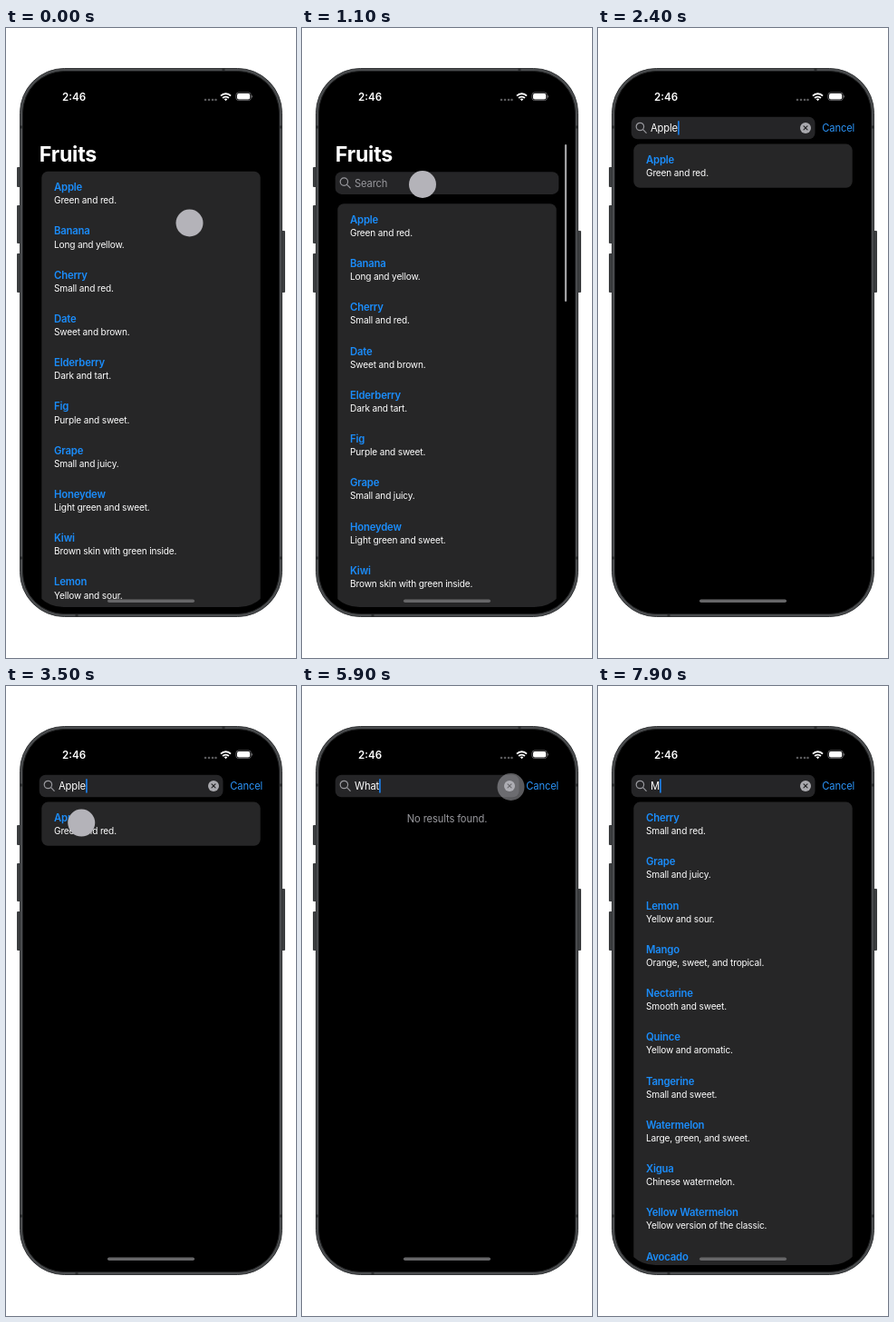
Recreate the animation shown at these times as an HTML page. Size 320x693 px, loop 8000 ms.

```html
<!DOCTYPE html>
<html lang="en">
<head>
<meta charset="utf-8">
<title>Fruits</title>
<style>
  html, body { margin: 0; width: 100%; height: 100%; overflow: hidden; background: #fff; }
  svg { display: block; width: 320px; height: 693px; }
  text { font: 400 11.2px Inter, "Liberation Sans", sans-serif; letter-spacing: -.13px; fill: #fff; }
  .name { font-size: 11.3px; font-weight: 600; letter-spacing: -.18px; fill: #1b8dfb; }
  .desc { font-size: 10.1px; letter-spacing: -.15px; }
  .title { font-size: 23.2px; font-weight: 700; letter-spacing: -.2px; }
  .time { font-size: 11.6px; font-weight: 600; letter-spacing: 0; }
  .hint { fill: #98989d; text-anchor: middle; }
  .head { font-size: 8.8px; letter-spacing: -.05px; fill: #8e8e93; }
  .blue { fill: #2b93f6; }
  .gray { fill: #98989d; }
  .panel { fill: #262627; }
</style>
</head>
<body>
<svg viewBox="0 0 320 693">
  <defs>
    <clipPath id="screen"><rect x="26" y="56" width="268" height="581" rx="37.5"/></clipPath>
  </defs>

  <!-- phone body -->
  <g fill="#3b3d3f">
    <rect x="12" y="153" width="5" height="22" rx="1"/>
    <rect x="12" y="195" width="5" height="42" rx="1"/>
    <rect x="12" y="248" width="5" height="43" rx="1"/>
    <rect x="303" y="223" width="5" height="68" rx="1"/>
  </g>
  <rect x="15.5" y="44.5" width="289" height="603" rx="49" fill="#4a4c4e" stroke="#333537"/>
  <path d="M240 44v4M78 644v4M15 109h4M301 109h4M15 583h4M301 583h4" stroke="#2b2d2e" stroke-width="3"/>
  <rect x="18.5" y="47.5" width="283" height="597" rx="46" fill="#000" stroke="#1d1e1f"/>

  <!-- status bar -->
  <text class="time" x="62" y="79.7">2:46</text>
  <g fill="#5a5a5c">
    <circle cx="220" cy="79" r="1.3"/><circle cx="224" cy="79" r="1.3"/>
    <circle cx="228" cy="79" r="1.3"/><circle cx="231.5" cy="79" r="1.3"/>
  </g>
  <g fill="none" stroke="#fff" stroke-width="1.9">
    <path d="M237 74.6a7.7 7.7 0 0 1 11 0M239.1 77a4.8 4.8 0 0 1 6.8 0"/>
  </g>
  <path d="M242.5 80.2l-1.8-1.9a2.6 2.6 0 0 1 3.6 0z" fill="#fff"/>
  <rect x="253.9" y="71" width="16.4" height="8.6" rx="2.7" fill="none" stroke="#77777a" stroke-width=".8"/>
  <rect x="255" y="72.1" width="14.2" height="6.4" rx="1.8" fill="#fff"/>
  <path d="M271.2 74v2.8q1-.4 1-1.4t-1-1.4z" fill="#77777a"/>

  <g clip-path="url(#screen)">
    <text class="title" id="title" x="36.7" y="147">Fruits</text>
    <g id="browse"></g>
    <g id="results"></g>

    <g id="recents">
      <text class="head" x="53" y="149">RECENT SEARCHES</text>
      <text class="blue" x="233" y="149.8" style="font-size:10.8px">CLEAR</text>
      <g id="recentRow" transform="translate(0 156.6)"></g>
    </g>

    <text class="hint" id="start" x="160" y="150" font-style="italic">Start searching for items now!</text>
    <text class="hint" id="none" x="160" y="150">No results found.</text>

    <g id="bar">
      <rect id="field" x="36.7" width="246.6" rx="7" fill="#252527"/>
      <g id="inner">
        <g fill="none" stroke="#98989d" stroke-width="1.2" stroke-linecap="round">
          <circle cx="46.4" cy="10.8" r="4.2"/><path d="M49.6 14l3.6 3.6"/>
        </g>
        <text class="gray" id="holder" x="58" y="16.4">Search</text>
        <text id="query" x="58" y="16.4"></text>
        <rect id="caret" y="4.4" width="1.6" height="15.6" rx=".8" fill="#1b84f4"/>
        <g id="clear">
          <circle cx="229" cy="12.2" r="6" fill="#a9a9ae"/>
          <path d="M227 10.2l4 4m0-4l-4 4" stroke="#252527" stroke-width="1.2" stroke-linecap="round"/>
        </g>
      </g>
    </g>
    <text class="blue" id="cancel" x="247.3" y="113.8">Cancel</text>

    <rect id="scroll" x="289.9" y="128" width="2.2" height="173" rx="1.1" fill="#a2a2a4"/>
    <rect x="112" y="628.4" width="96" height="3.5" rx="1.75" fill="#666668"/>
  </g>
  <circle id="dot" r="15" fill="#b4b3b9"/>
</svg>

<script>
const LOOP = 8000, ROW = 48.25;
const $ = id => document.getElementById(id);

const fruits = `Apple|Green and red.
Banana|Long and yellow.
Cherry|Small and red.
Date|Sweet and brown.
Elderberry|Dark and tart.
Fig|Purple and sweet.
Grape|Small and juicy.
Honeydew|Light green and sweet.
Kiwi|Brown skin with green inside.
Lemon|Yellow and sour.
Mango|Orange, sweet, and tropical.
Nectarine|Smooth and sweet.
Quince|Yellow and aromatic.
Tangerine|Small and sweet.
Watermelon|Large, green, and sweet.
Xigua|Chinese watermelon.
Yellow Watermelon|Yellow version of the classic.
Avocado|Creamy and green.`.split('\n').map(s => s.split('|'));

function panel(items) {
  if (!items.length) return '';
  const rows = items.map(([name, desc], i) => {
    const y = i * ROW;
    return `<text class="name" x="53" y="${y + 21.5}">${name}</text>` +
           `<text class="desc" x="53" y="${y + 35.6}">${desc}</text>`;
  });
  return `<rect class="panel" x="39.3" width="241.4" height="${items.length * ROW}" rx="7"/>` + rows.join('');
}

const find = q => fruits.filter(f => f.join(' ').toLowerCase().includes(q.toLowerCase()));

// Eased value between [time, value] stops
function tween(t, ...stops) {
  let [t0, v0] = stops[0];
  for (const [t1, v1] of stops) {
    if (t < t1) {
      const p = Math.max(0, (t - t0) / (t1 - t0));
      return v0 + (v1 - v0) * p * p * (3 - 2 * p);
    }
    t0 = t1; v0 = v1;
  }
  return v0;
}

// [time, text in the field]
const typing = [
  [1700, ''], [1900, 'A'], [2050, 'Ap'], [2200, 'App'], [2300, 'Appl'], [2400, 'Apple'],
  [4250, ''], [4800, 'W'], [5000, 'Wh'], [5200, 'Wha'], [5400, 'What'],
  [6250, ''], [7500, 'M']
];

function blink(since) {
  if (since < 500) return 1;
  const p = (since - 500) % 800;
  return p < 100 ? 1 - p / 100 : p < 300 ? 0 : 1;
}

const move = (el, x, y) => el.setAttribute('transform', `translate(${x} ${y})`);
const fade = (id, v) => { $(id).style.opacity = v; };

$('browse').innerHTML = panel(fruits);
$('recentRow').innerHTML = panel(fruits.slice(0, 1));
move($('results'), 0, 127.6);

let shown = null;
function setQuery(q) {
  if (q === shown) return;
  shown = q;
  $('query').textContent = q;
  $('results').innerHTML = q && q[0] !== 'W' ? panel(find(q)) : '';
}

function draw(t) {
  const pull = tween(t, [0, 0], [600, 1]);
  const open = tween(t, [1200, 0], [1700, 1]);
  const [since, q] = typing.filter(k => k[0] <= t).pop() || [0, ''];
  setQuery(q);

  // browse page
  move($('title'), 0, -40 * open);
  fade('title', Math.max(0, 1 - 2 * open));
  move($('browse'), 0, 157.7 + 35.6 * pull - 65.7 * open);
  fade('browse', 1 - open);
  fade('scroll', tween(t, [0, 0], [250, 1], [1150, 1], [1450, 0]));

  // search field
  move($('bar'), 0, 158.3 - 60.6 * open);
  $('field').setAttribute('height', 24.6 * pull);
  $('field').setAttribute('width', 246.6 - 43.8 * open);
  fade('inner', Math.max(0, pull * 2 - 1));
  fade('cancel', open);
  fade('holder', q ? 0 : 1);
  fade('clear', q ? 1 : 0);
  $('caret').setAttribute('x', q ? 58 + $('query').getComputedTextLength() + .1 : 58);
  fade('caret', t < 1700 ? 0 : blink(t - since));

  // page below the field
  fade('start', t < 1900 ? tween(t, [1450, 0], [1750, 1]) : 0);
  fade('results', tween(t, [1850, 0], [2200, 1], [7000, 1], [7001, 0], [7420, 0], [7850, 1]));
  fade('recents', tween(t, [4250, 0], [4390, 1], [4760, 1], [5100, 0], [6250, 0], [6480, 1], [7420, 1], [7700, 0]));
  fade('none', tween(t, [5050, 0], [5400, 1], [6200, 1], [6400, 0]));

  // pointer
  move($('dot'),
    tween(t, [650, 202.5], [1050, 133], [2950, 133], [3250, 78], [3450, 78], [3900, 230.5]),
    tween(t, [0, 214.5], [500, 256], [650, 256], [1050, 172], [2950, 172], [3250, 152], [3450, 152], [3900, 111]));
  fade('dot', tween(t, [1300, 1], [1650, 0], [2850, 0], [3100, 1], [4250, 1], [4550, .0],
    [5800, 0], [6000, 1], [6250, 1], [6500, 0]));
}

let begin = null;
function tick(now) {
  if (begin === null) begin = now;
  draw((now - begin) % LOOP);
  requestAnimationFrame(tick);
}
draw(0);
requestAnimationFrame(tick);
</script>
</body>
</html>
```
